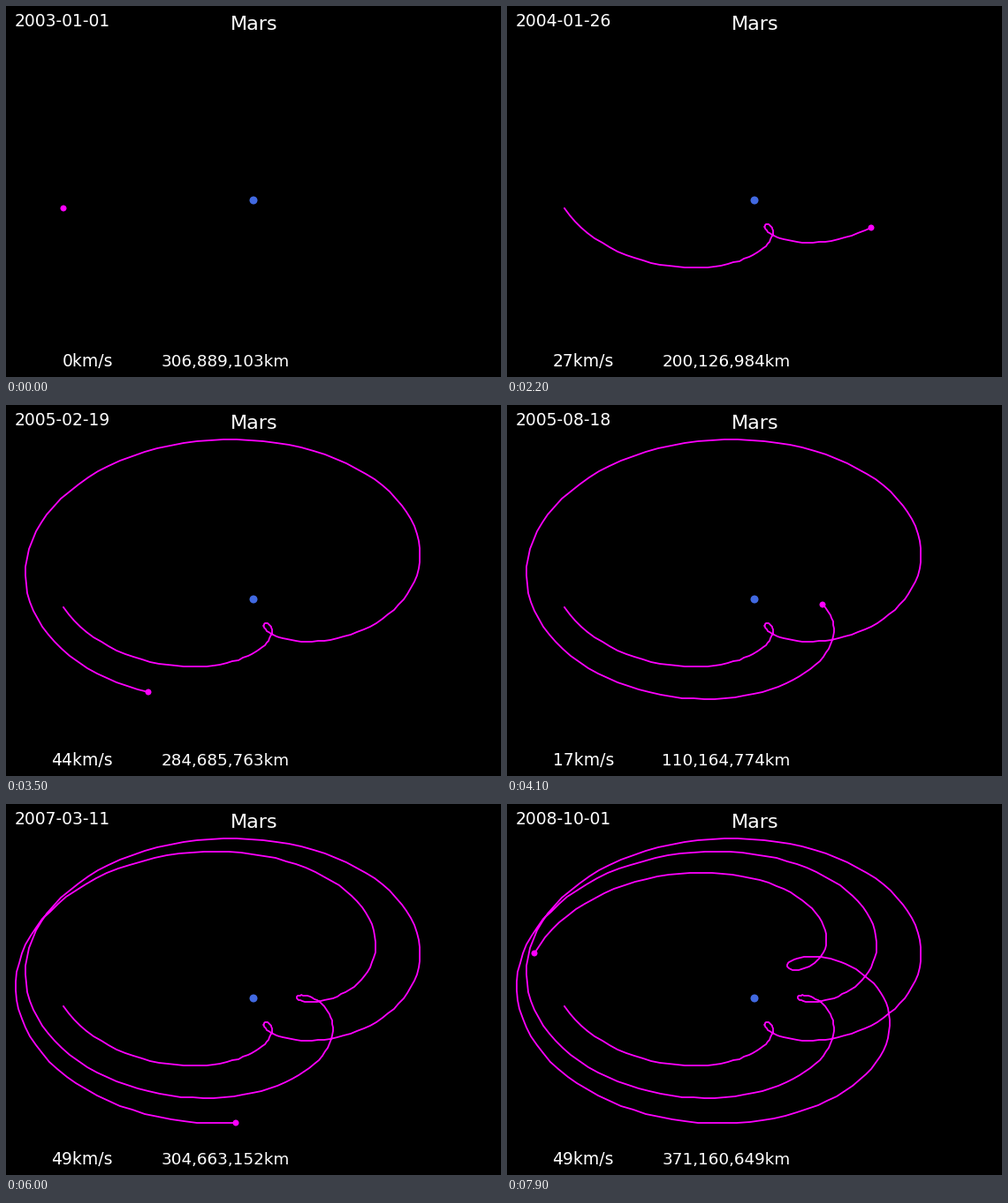
Animation of 560 by 420 pixels, one loop 8000 ms. Source, as a matplotlib script:

```python
import numpy as np
import matplotlib.pyplot as plt
from matplotlib.animation import FuncAnimation
from matplotlib.patches import Circle

W, H, DPI = 560, 420, 100
PX = 72 / DPI                  # points per pixel
AU = 149597870.7               # km
START = np.datetime64("2003-01-01")
START_KM = 306889103
EPOCH = 1095.5                 # days from J2000 to START
SAMPLE, STEP = 5, 30           # days per trail point and per tick
HOLD, FRAMES = 9, 80

CENTER = np.array([280, 220])
SCALE = 105.14                 # pixels per AU
AZIMUTH = np.radians(45)
TILT = np.arcsin(0.647)        # height of the eye above the ecliptic


def orbit(days, a, e, mean_lon, rate, peri, incl=0, node=0):
    """Heliocentric ecliptic position (AU) on a Kepler orbit."""
    M = np.radians(mean_lon + rate * (days + EPOCH) - peri)
    E = M
    for _ in range(12):
        E = M + e * np.sin(E)
    x, y = a * (np.cos(E) - e), a * np.sqrt(1 - e * e) * np.sin(E)
    w, i, node = np.radians(peri - node), np.radians(incl), np.radians(node)
    u = x * np.cos(w) - y * np.sin(w)
    v = x * np.sin(w) + y * np.cos(w)
    return np.column_stack([
        u * np.cos(node) - v * np.cos(i) * np.sin(node),
        u * np.sin(node) + v * np.cos(i) * np.cos(node),
        v * np.sin(i)])


def project(p):
    """Whole-pixel stage position of a point relative to the centre."""
    x, y, z = p.T
    right = x * np.cos(AZIMUTH) + y * np.sin(AZIMUTH)
    depth = y * np.cos(AZIMUTH) - x * np.sin(AZIMUTH)
    up = depth * np.sin(TILT) + z * np.cos(TILT)
    return np.round(CENTER + SCALE * np.column_stack([right, -up]))


days = np.arange(0, (FRAMES - 1 - HOLD) * STEP + 1, SAMPLE)
earth = orbit(days, a=1.0, e=0.01671, mean_lon=100.46457,
              rate=0.9856091, peri=102.953)
mars = orbit(days, a=1.52371, e=0.0934, mean_lon=-4.55343,
             rate=0.5240329, peri=-23.9185, incl=1.8491, node=49.542)
geo = mars - earth
path = project(geo)
km = np.linalg.norm(geo, axis=1) * AU
km += START_KM - km[0]

fig = plt.figure(figsize=(W / DPI, H / DPI), dpi=DPI, facecolor="black")
ax = fig.add_axes([0, 0, 1, 1])
ax.set_xlim(0, W)
ax.set_ylim(H, 0)
ax.axis("off")


def label(x, y, size, ha, text=""):
    return ax.text(x, y, text, color="white", family="DejaVu Sans",
                   size=size * PX, ha=ha, va="baseline")


def ball(center, radius, color):
    return ax.add_patch(Circle(center, radius, fc=color, lw=0, zorder=3))


label(280.5, 27, 22.3, "center", "Mars")
date = label(10, 23, 18.8, "left")
speed = label(121, 408, 18.8, "right")
span = label(320.5, 408, 18.4, "right")

trail, = ax.plot([], [], color="#ff00ff", lw=1.8 * PX,
                 solid_joinstyle="round", zorder=2)
ball(CENTER, 4.5, "#4169e1")
dot = ball(path[0], 3.5, "#ff00ff")


def draw(frame):
    day = max(0, frame - HOLD) * STEP
    now, before = day // SAMPLE, max(0, day - STEP) // SAMPLE
    moved = np.linalg.norm(geo[now] - geo[before]) * AU
    trail.set_data(*path[:now + 1].T)
    dot.center = path[now]
    date.set_text(str(START + day))
    speed.set_text(f"{moved / (STEP * 86400):.0f}km/s")
    span.set_text(f"{km[now]:,.0f}km")
    return trail, dot, date, speed, span


anim = FuncAnimation(fig, draw, frames=FRAMES, interval=100,
                     repeat=True, repeat_delay=0)
plt.show()
```
